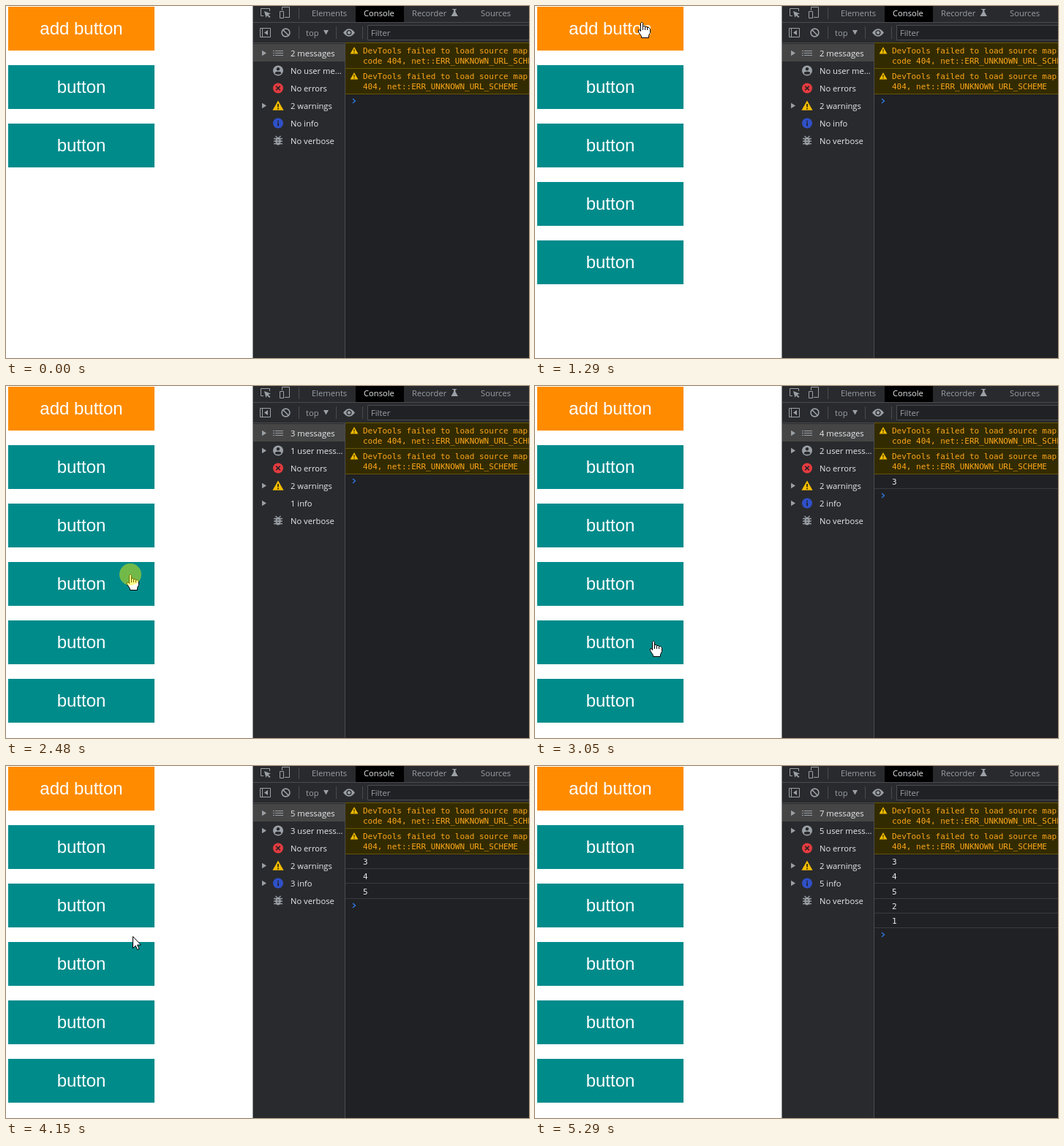
Recreate the animation shown at these times as an HTML page with a canvas. Size 715x482 px, loop 5.6 s.

```html
<!DOCTYPE html>
<html lang="en">
<head>
<meta charset="utf-8">
<title>Button log</title>
<style>
html, body { margin: 0; width: 100%; height: 100%; overflow: hidden; background: #fff; }
canvas { display: block; }
</style>
</head>
<body>
<canvas id="stage" width="715" height="482"></canvas>
<script>
const ctx = document.getElementById('stage').getContext('2d');
const LOOP = 5600;
const UI = '11.2px "Open Sans", "Noto Sans", sans-serif';
const MONO = '11px "DejaVu Sans Mono", monospace';
const BIG = '24px "Liberation Sans", Arial, sans-serif';
const GREY = '#9aa0a6', PANEL = '#292a2d', BODY = '#202124', LINE = '#494c50';

const addTimes = [960, 1290, 1670];
const sideTimes = [2480, 3050, 3480, 4380, 4660];
const logTimes = [2510, 3080, 3510, 4410, 4690];
const logValues = [3, 4, 5, 2, 1];
const presses = [[860, 960], [1190, 1290], [1570, 1670], [2360, 2510],
  [2970, 3050], [3400, 3510], [4310, 4410], [4600, 4690]];

const smooth = u => u * u * (3 - 2 * u);
const easeIn = u => u * u;
const easeOut = u => 1 - (1 - u) * (1 - u);

// start, end, target x, target y, easing, sideways bulge
const moves = [
  [70, 600, 153, 39, smooth, 0],
  [670, 860, 146, 22, smooth, 0],
  [1900, 2360, 170, 258, smooth, 58],
  [2510, 2950, 162, 349, smooth, 0],
  [3080, 3390, 158, 419, smooth, 0],
  [3770, 4290, 176, 193, smooth, 0],
  [4390, 4500, 165, 119, smooth, 0],
  [4500, 4600, 154, 107, easeOut, 0],
  [4690, 4920, 577, 335, easeIn, 0],
  [4920, 5290, 712, 484, easeOut, 0]
];

function pointerAt(t) {
  let x = 630, y = 443;
  for (const [start, end, tx, ty, ease, bulge] of moves) {
    if (t < start) break;
    const u = ease(Math.min(1, (t - start) / (end - start)));
    x += (tx - x) * u + bulge * Math.sin(Math.PI * u);
    y += (ty - y) * u;
  }
  return [Math.round(x), Math.round(y)];
}

const countBefore = (times, t) => times.filter(v => t >= v).length;

function box(x, y, w, h, color) {
  ctx.fillStyle = color;
  ctx.fillRect(x, y, w, h);
}

function text(str, x, y, font, color, align = 'left') {
  ctx.font = font;
  ctx.fillStyle = color;
  ctx.textAlign = align;
  ctx.fillText(str, x, y);
}

function disc(x, y, r, color) {
  ctx.fillStyle = color;
  ctx.beginPath();
  ctx.arc(x, y, r, 0, 7);
  ctx.fill();
}

function trace(points, close) {
  ctx.beginPath();
  points.forEach(([x, y]) => ctx.lineTo(x, y));
  if (close) ctx.closePath();
}

function poly(points, color) {
  trace(points, true);
  ctx.fillStyle = color;
  ctx.fill();
}

function stroke(points, color, width = 1) {
  trace(points, false);
  ctx.strokeStyle = color;
  ctx.lineWidth = width;
  ctx.stroke();
}

function outline(x, y, w, h, color) {
  ctx.strokeStyle = color;
  ctx.lineWidth = 1;
  ctx.strokeRect(x + .5, y + .5, w - 1, h - 1);
}

function button(i, label, color) {
  const y = 1 + 80 * i;
  box(3, y, 200, 60, color);
  text(label, 103, y + 38, BIG, '#fff', 'center');
}

function warnIcon(x, y, s) {
  ctx.lineJoin = 'round';
  poly([[x, y - s], [x + s * 1.08, y + s * .9], [x - s * 1.08, y + s * .9]], '#f5bd00');
  box(x - s * .13, y - s * .35, s * .26, s * .62, '#3a2d00');
  box(x - s * .13, y + s * .45, s * .26, s * .24, '#3a2d00');
}

function tabs() {
  box(338, 0, 377, 50, PANEL);
  box(478, 0, 66, 22, '#000');
  box(338, 22, 377, 1, LINE);
  // inspect and device icons
  stroke([[352, 13.5], [348.5, 13.5], [348.5, 3.5], [360.5, 3.5], [360.5, 7]], GREY);
  poly([[353, 7], [362, 10.5], [358.5, 11.7], [361.5, 14.8], [360, 16], [357, 13], [355.5, 16]], GREY);
  outline(377, 1, 11, 15, GREY);
  box(373, 6, 8, 11, PANEL);
  outline(374, 7, 6, 10, GREY);
  box(400, 2, 1, 16, LINE);
  text('Elements', 418, 14, UI, GREY);
  text('Console', 489, 14, UI, '#e8eaed');
  text('Recorder', 555, 14, UI, GREY);
  box(610, 4, 6, 1, GREY);
  poly([[612, 5], [614.5, 5], [614.5, 8], [618, 14], [608.5, 14], [612, 8]], GREY);
  text('Sources', 649, 14, UI, GREY);
}

function toolbar() {
  outline(347, 30, 15, 13, GREY);
  box(350, 30, 1, 13, GREY);
  poly([[358, 33], [358, 40], [353, 36.5]], GREY);
  ctx.strokeStyle = GREY;
  ctx.lineWidth = 1.6;
  ctx.beginPath();
  ctx.arc(382.5, 36.5, 5.4, 0, 7);
  ctx.stroke();
  stroke([[378.8, 32.8], [386.2, 40.2]], GREY, 1.6);
  for (const x of [400, 451, 487]) box(x, 28, 1, 17, LINE);
  text('top', 410, 41, UI, GREY);
  poly([[434, 33], [441, 33], [437.5, 39.5]], GREY);
  // eye
  ctx.fillStyle = GREY;
  ctx.beginPath();
  ctx.moveTo(461, 36.5);
  ctx.quadraticCurveTo(469, 26, 477, 36.5);
  ctx.quadraticCurveTo(469, 47, 461, 36.5);
  ctx.fill();
  disc(469, 36.5, 3.6, PANEL);
  disc(469, 36.5, 2.2, GREY);
  box(494, 26, 221, 21, BODY);
  outline(494, 26, 223, 21, LINE);
  text('Filter', 499, 41, UI, GREY);
}

const icons = [
  y => {
    for (const d of [-3, 0, 3]) {
      box(365, y + d - .5, 2, 1, GREY);
      box(368, y + d - .5, 11, 1, GREY);
    }
  },
  y => {
    disc(372, y, 7, GREY);
    disc(372, y - 2.3, 2.2, PANEL);
    ctx.beginPath();
    ctx.ellipse(372, y + 3.3, 4.2, 2, 0, 0, 7);
    ctx.fill();
  },
  y => {
    disc(372, y, 7, '#e43b3f');
    stroke([[369.2, y - 2.8], [374.8, y + 2.8]], BODY, 1.6);
    stroke([[374.8, y - 2.8], [369.2, y + 2.8]], BODY, 1.6);
  },
  y => warnIcon(372, y, 7),
  y => {
    disc(372, y, 7, '#2f50c8');
    box(371.2, y - 3.6, 1.7, 1.7, BODY);
    box(371.2, y - .8, 1.7, 4.6, BODY);
  },
  y => {
    ctx.fillStyle = GREY;
    ctx.beginPath();
    ctx.ellipse(372, y + .5, 3.7, 5.5, 0, 0, 7);
    ctx.fill();
    for (const d of [-3, .5, 4]) box(366, y + d - .6, 12, 1.4, GREY);
    stroke([[368.5, y - 6.5], [370.5, y - 4.5]], GREY, 1.3);
    stroke([[375.5, y - 6.5], [373.5, y - 4.5]], GREY, 1.3);
    box(370.5, y - 1.6, 3, 1, PANEL);
    box(370.5, y + 1.7, 3, 1, PANEL);
  }
];

function sidebar(n, infoIcon) {
  box(338, 50, 125, 432, PANEL);
  box(338, 52, 125, 24, '#454545');
  const rows = [
    [`${n + 2} messages`, true],
    [n ? `${n} user mess...` : 'No user me...', n > 0],
    ['No errors', false],
    ['2 warnings', true],
    [n ? `${n} info` : 'No info', n > 0],
    ['No verbose', false]
  ];
  rows.forEach(([label, opens], i) => {
    const y = 64.5 + 24 * i;
    if (opens) poly([[350, y - 3.7], [350, y + 3.7], [356, y]], GREY);
    if (i !== 4 || infoIcon) icons[i](y);
    text(label, 389, y + 4.5, UI, '#e8eaed');
  });
}

function warning(y, first, second) {
  box(464, y, 251, 35, '#332b00');
  box(464, y, 251, 1, '#665500');
  box(464, y + 35, 251, 1, '#665500');
  warnIcon(476, y + 11, 5);
  text(first, 488, y + 15, MONO, '#fba61c');
  text(second, 488, y + 29, MONO, '#fba61c');
}

function consoleLog(n) {
  box(464, 50, 251, 432, BODY);
  warning(50, 'DevTools failed to load source map: Could', 'code 404, net::ERR_UNKNOWN_URL_SCHEME');
  warning(85, 'DevTools failed to load source map: Could', '404, net::ERR_UNKNOWN_URL_SCHEME');
  for (let i = 0; i < n; i++) {
    const y = Math.round(20.25 * i);
    text(logValues[i], 488, 135 + y, MONO, '#e8eaed');
    box(464, 140 + y, 251, 1, '#3a3b3e');
  }
  const y = 130 + Math.round(20.25 * n);
  stroke([[474, y - 3], [477.5, y], [474, y + 3]], '#2f72d9', 1.6);
}

const arrow = [[.5, .5], [.5, 16.5], [4.2, 13], [6.6, 18.5], [9, 17.5], [6.6, 12], [11.5, 12]];
const hand = [[-1.5, 1.5], [-.5, .5], [.5, .5], [1.5, 1.5], [1.5, 5.5], [4, 5.5], [5, 6.5],
  [7, 6.5], [8, 7.5], [9.5, 7.5], [11.5, 9.5], [11.5, 14.5], [9.5, 18.5], [9.5, 21.5],
  [-.5, 21.5], [-.5, 19.5], [-4.5, 13.5], [-4.5, 11], [-3, 10.5], [-1.5, 12.5]];

function pointer(x, y, isHand) {
  ctx.save();
  ctx.translate(x, y);
  const shape = isHand ? hand : arrow;
  poly(shape, '#fff');
  stroke([...shape, shape[0]], '#000');
  if (isHand) {
    for (const [fx, top] of [[1.5, 5], [4.5, 6], [7.5, 7]]) {
      stroke([[fx, top], [fx, 11]], '#000');
    }
  }
  ctx.restore();
}

function draw(t) {
  const buttons = 2 + countBefore(addTimes, t);
  box(0, 0, 337, 482, '#fff');
  button(0, 'add button', '#ff8c00');
  for (let i = 1; i <= buttons; i++) button(i, 'button', '#008b8b');

  box(337, 0, 1, 482, '#85868a');
  tabs();
  toolbar();
  const logged = countBefore(sideTimes, t);
  sidebar(logged, t < sideTimes[0] || t >= logTimes[0]);
  consoleLog(countBefore(logTimes, t));
  box(338, 50, 126, 1, LINE);
  box(463, 50, 1, 432, LINE);

  if (t < 70 || t >= 5290) return;
  const [x, y] = pointerAt(t);
  const row = Math.floor((y - 1) / 80);
  const over = x >= 3 && x < 203 && row <= buttons && (y - 1) % 80 < 60;
  pointer(x, y, over);
  if (presses.some(([on, off]) => t >= on && t < off)) {
    disc(x, y, 15, 'rgba(240, 240, 0, .47)');
  }
}

function tick() {
  draw(performance.now() % LOOP);
  requestAnimationFrame(tick);
}
tick();
</script>
</body>
</html>
```
